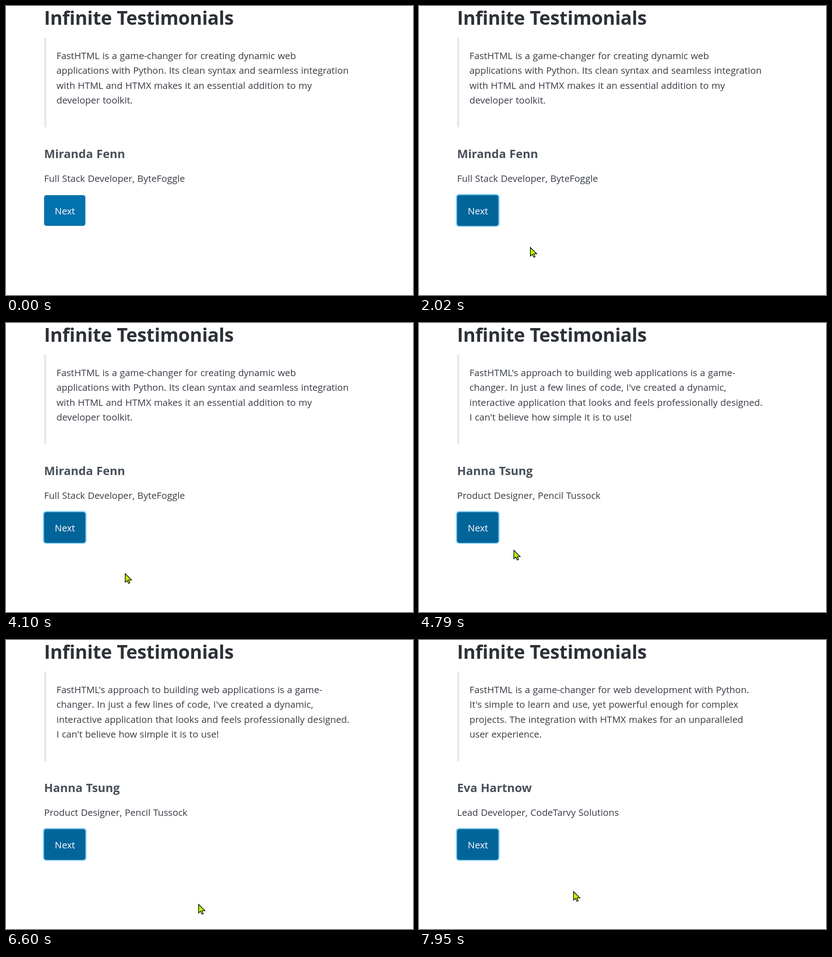
Recreate the animation shown at these times as an HTML page. Size 887x631 px, loop 8 s.

```html
<!DOCTYPE html>
<html lang="en">
<head>
<meta charset="utf-8">
<title>Infinite Testimonials</title>
<style>
  html, body { margin: 0; width: 100%; height: 100%; overflow: hidden; background: #fff; }
  svg { display: block; width: 887px; height: 631px; }
  text { font-family: "Open Sans", "Noto Sans", sans-serif; font-size: 20.35px; word-spacing: .7px; fill: #373c44; white-space: pre; }
  .title { font-size: 41px; font-weight: 700; letter-spacing: -.35px; fill: #2d3138; }
  .name { font-size: 25.5px; font-weight: 700; fill: #48505a; }
  .label { fill: #fff; text-anchor: middle; }
  .cursor { fill: #bfff00; stroke: #000; stroke-width: 1.4; }
</style>
</head>
<body>
<svg viewBox="0 0 887 631">
  <text class="title" x="83" y="41">Infinite Testimonials</text>
  <rect x="83" y="69" width="5" height="195.5" fill="#e8e8f0"/>
  <g id="quote"></g>
  <text class="name" id="name" x="83" y="332"></text>
  <text id="role" x="83" y="384"></text>
  <rect id="ring" x="80.5" y="410.5" width="95" height="71.5" rx="7" fill="#80ccf3"/>
  <rect id="button" x="83" y="413" width="90" height="67" rx="5"/>
  <text class="label" x="128.4" y="455">Next</text>
  <g class="cursor" id="cursor">
    <path id="arrow" d="M.7 1.2V20L5 16.1L8 22.6L11 21.3L8.2 15.1H14.6Z"/>
    <g id="hand" stroke-linejoin="round" stroke-linecap="round">
      <path d="M-1 2.5C-1 .2 3 .2 3 2.5V8.5C3.4 7 6.6 7.2 6.8 9C7.3 7.9 9.8 8.2 10 10
        C10.5 9 12.5 9.4 12.5 11V18C12.5 21 10.5 22.5 10 24.2C9 27.3 -.5 27.3 -1.5 24.2
        C-2.5 21.5 -5.5 18.5 -7.2 15.6C-8.4 13.4 -5.5 11.8 -3.6 13.8L-1 16.4Z"/>
      <path d="M3 8.5V13.5M6.8 9V13.5M10 10V14" fill="none"/>
    </g>
  </g>
</svg>
<script>
const LOOP = 8000;
const $ = id => document.getElementById(id);

const reviews = [
  { at: 0, name: 'Miranda Fenn', role: 'Full Stack Developer, ByteFoggle', lines: [
    'FastHTML is a game-changer for creating dynamic web',
    'applications with Python. Its clean syntax and seamless integration',
    'with HTML and HTMX makes it an essential addition to my',
    'developer toolkit.'] },
  { at: 4200, name: 'Hanna Tsung', role: 'Product Designer, Pencil Tussock', lines: [
    "FastHTML's approach to building web applications is a game-",
    "changer. In just a few lines of code, I've created a dynamic,",
    'interactive application that looks and feels professionally designed.',
    "I can't believe how simple it is to use!"] },
  { at: 7530, name: 'Eva Hartnow', role: 'Lead Developer, CodeTarvy Solutions', lines: [
    'FastHTML is a game-changer for web development with Python.',
    "It's simple to learn and use, yet powerful enough for complex",
    'projects. The integration with HTMX makes for an unparalleled',
    'user experience.'] }
];

// Pointer moves: start, end, number of steps, points along the way
const moves = [
  [130, 890, 12, '598,586 423,543 333,531 277,523 207,508 165,495 152,476 148,466 147,462 148,461 148,461 149,461'],
  [1150, 1150, 1, '149,462'],
  [1750, 2090, 6, '149,462 153,466 172,485 208,509 242,526 257,532'],
  [2490, 2490, 1, '257,531'],
  [3370, 3580, 4, '257.5,534 262,540 263,548 259,553'],
  [3980, 4440, 7, '258,551 259,540 261,528 260,523'],
  [4790, 4930, 3, '206,495 171,481 157,471'],
  [5200, 5730, 8, '152,462 149,452 155,457 190,481 272,520 364,556 437,581 435,583'],
  [6130, 6200, 2, '428,580 420,577'],
  [6600, 7350, 11, '419,576 395,562 366,546 347,533 339,529 337,529'],
  [7730, 7800, 2, '339,543 341,556'],
  [7950, 7950, 1, '336,547.5']
].map(([start, end, steps, path]) =>
  ({ start, end, steps, pts: path.split(' ').map(p => p.split(',').map(Number)) }));

const clamp = v => Math.min(1, Math.max(0, v));
const mix = (a, b, p) => a + (b - a) * p;
const ease = v => { const p = clamp(v); return p * p * (3 - 2 * p); };
const latest = (list, key, t) => list.filter(e => e[key] <= t).pop();

function pointerAt(t) {
  const m = latest(moves, 'start', t);
  if (!m) return null;
  const last = m.steps - 1;
  const span = m.end - m.start;
  const p = last ? Math.min(last, Math.floor((t - m.start + 4) / span * last)) / last : 0;
  const pos = p * (m.pts.length - 1);
  const i = Math.floor(pos);
  const a = m.pts[i], b = m.pts[i + 1] || a;
  return [0, 1].map(k => mix(a[k], b[k], pos - i));
}

const overButton = ([x, y]) => x > 83 && x < 173 && y > 413 && y < 480;

const rows = [116, 148, 181, 213].map(y => {
  const row = document.createElementNS('http://www.w3.org/2000/svg', 'text');
  row.setAttribute('x', 110);
  row.setAttribute('y', y);
  $('quote').append(row);
  return row;
});

let shown;
function showReview(review) {
  if (review === shown) return;
  shown = review;
  rows.forEach((row, i) => { row.textContent = review.lines[i]; });
  $('name').textContent = review.name;
  $('role').textContent = review.role;
}

function draw(t) {
  showReview(latest(reviews, 'at', t));

  const hover = ease((t - 540) / 200);
  const rgb = [[1, 2], [114, 101], [173, 154]].map(([a, b]) => Math.round(mix(a, b, hover)));
  $('button').setAttribute('fill', `rgb(${rgb})`);
  $('ring').setAttribute('opacity', ease((t - 1720) / 200));

  const pos = pointerAt(t);
  $('cursor').style.display = pos ? '' : 'none';
  if (!pos) return;
  const hand = overButton(pos);
  $('cursor').setAttribute('transform', `translate(${pos.map(Math.round)})`);
  $('hand').style.display = hand ? '' : 'none';
  $('arrow').style.display = hand ? 'none' : '';
}

const begin = performance.now();
function tick() {
  draw((performance.now() - begin) % LOOP);
  requestAnimationFrame(tick);
}
draw(0);
requestAnimationFrame(tick);
</script>
</body>
</html>
```
